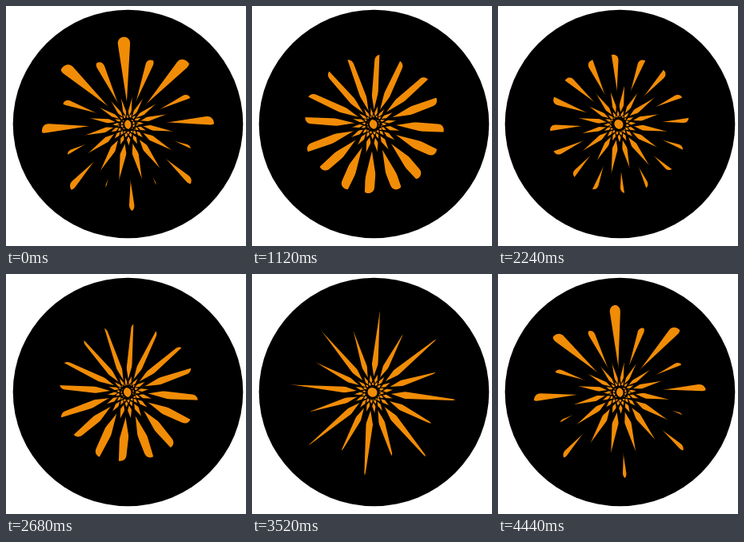
Write an HTML page with a canvas that moves like this. It is 300 px wide and 300 px high and loops after 4.48 s.

```html
<!DOCTYPE html>
<html lang="en">
<head>
<meta charset="utf-8">
<title>Sunburst</title>
<style>
  html, body { margin: 0; width: 100%; height: 100%; overflow: hidden; background: #fff; }
  canvas { display: block; width: 300px; height: 300px; }
</style>
</head>
<body>
<canvas id="stage" width="300" height="300"></canvas>
<script>
const ctx = document.getElementById('stage').getContext('2d');
const LOOP = 4480, STEP = 40;
const SWEEP = 45;        // the mask turns this far, then starts again
const SWEEPS = 3;        // sweeps per loop
const START = 39.5;
const ORANGE = '#f18c06';
const CENTER = { x: 150.1, y: 148.3 };
const PIVOT = { x: 151.9, y: 154.7 };   // the mask turns slightly off centre
const SHIFT = { x: -0.5, y: -0.6 };

const LONG = { left: [5.3, -0.155], right: [6.2, 0.035], end: 100, tip: 110 };
const SHORT = { left: [5.1, -0.145], right: [6.1, 0.022], end: 79, tip: 87 };

// A lopsided wedge pointing up, its straight sides given as [offset, slope].
function blade({ left, right, end, tip }) {
  const at = ([offset, slope], r) => offset + slope * r;
  const base = 7;
  const top = end + (tip - end) / 0.75;
  const p = new Path2D();
  p.moveTo(at(left, base), -base);
  p.lineTo(at(right, base), -base);
  p.lineTo(at(right, end), -end);
  p.bezierCurveTo(at(right, top), -top, at(left, top), -top, at(left, end), -end);
  p.closePath();
  return p;
}

// Sixteen blades, long and short in turn, around a dot; flip -1 mirrors them.
function wheel(flip) {
  const p = new Path2D();
  const blades = [blade(LONG), blade(SHORT)];
  for (let i = 0; i < 16; i++) {
    p.addPath(blades[i % 2], new DOMMatrix().rotate(i * 22.5).scale(flip, 1));
  }
  p.moveTo(6.4, 0);
  p.arc(0, 0, 6.4, 0, Math.PI * 2);
  return p;
}

function placed(path, matrix) {
  const p = new Path2D();
  p.addPath(path, matrix);
  return p;
}

const rays = placed(wheel(1), new DOMMatrix().translate(CENTER.x, CENTER.y));
const mask = wheel(-1);

function turnedMask(angle) {
  return placed(mask, new DOMMatrix()
    .translate(PIVOT.x, PIVOT.y)
    .rotate(angle)
    .translate(CENTER.x + SHIFT.x - PIVOT.x, CENTER.y + SHIFT.y - PIVOT.y));
}

function draw(time) {
  const t = Math.floor((time % LOOP) / STEP) * STEP;
  ctx.fillStyle = '#fff';
  ctx.fillRect(0, 0, 300, 300);
  ctx.fillStyle = '#000';
  ctx.beginPath();
  ctx.ellipse(152.5, 147.5, 143.8, 142.8, 0, 0, Math.PI * 2);
  ctx.fill();

  ctx.save();
  ctx.clip(turnedMask((START + SWEEP * SWEEPS * t / LOOP) % SWEEP));
  ctx.fillStyle = ORANGE;
  ctx.fill(rays);
  ctx.restore();
}

const begin = performance.now();
function tick() {
  draw(performance.now() - begin);
  requestAnimationFrame(tick);
}
tick();
</script>
</body>
</html>
```
